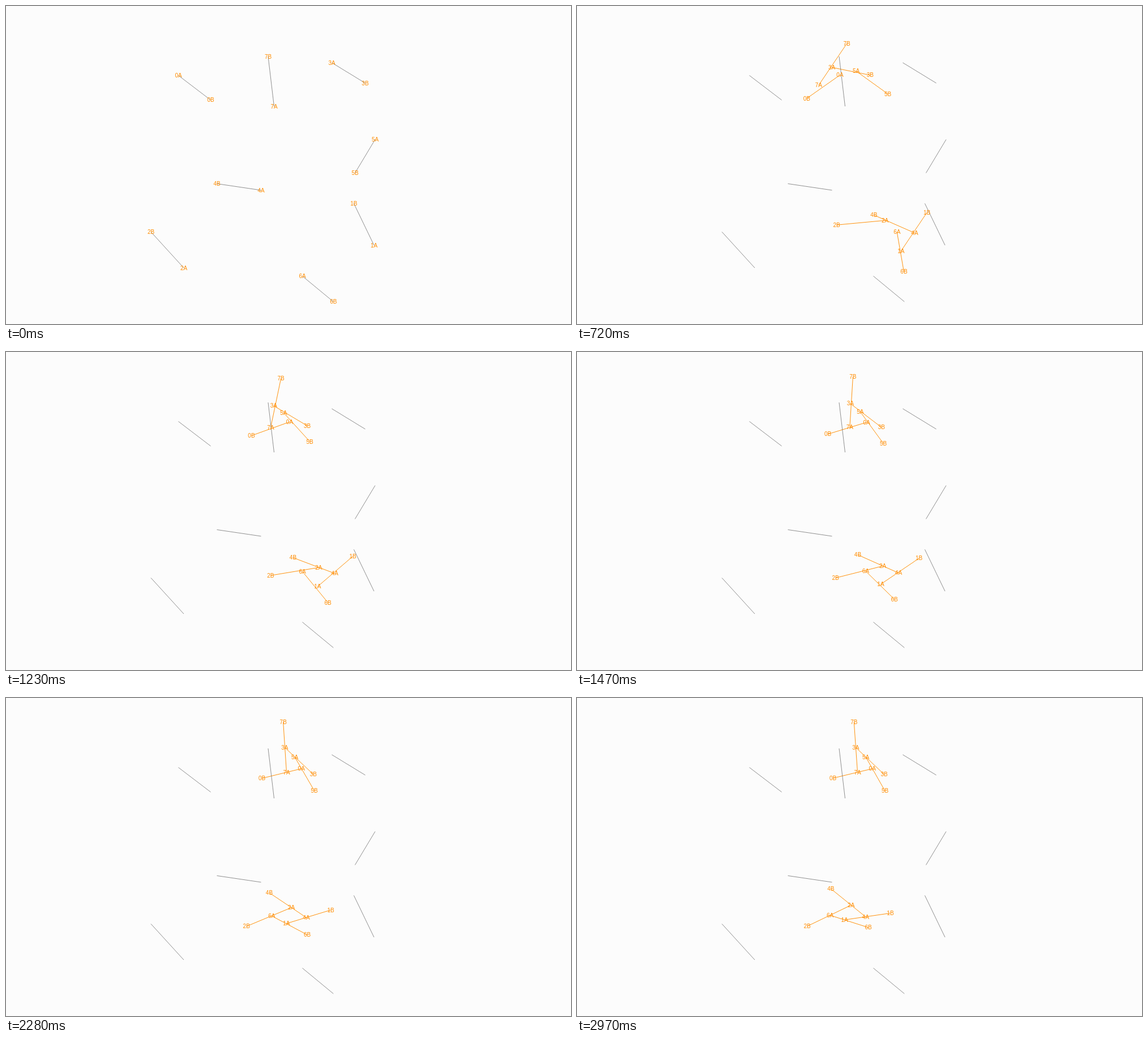
Write an HTML page with a canvas that moves like this. It is 998 px wide and 561 px high and loops after 3600 ms.

```html
<!DOCTYPE html>
<html>
<head>
<meta charset="utf-8">
<style>
html, body { margin: 0; width: 100%; height: 100%; overflow: hidden; background: #fcfcfc; }
canvas { display: block; }
</style>
</head>
<body>
<canvas id="stage" width="998" height="561"></canvas>
<script>
const ctx = document.getElementById('stage').getContext('2d');
const LOOP = 3600, STEP = 30, SWING = 420, MEET = 990, END = 2970;

// Each ring of rods closes on itself: end A of the next rod comes to rest on
// the current one. A rod flies from start through swing to meet, each given
// as end A and heading in degrees, then end A eases to rest.
const rings = [
  { settle: 1860, power: 1.5, rods: [
    { id: 7, length: 88.6, start: [473.5, 177, -96.8], swing: [401, 149, -46.2], meet: [450, 135, -66.1], rest: [495.5, 131] },
    { id: 3, length: 69.1, start: [575.5, 100, 31.4], swing: [447.5, 119, 0.8], meet: [460.5, 99.5, 20.9], rest: [492.4, 87.3] },
    { id: 5, length: 68.9, start: [652, 235.5, 121], swing: [526.5, 133, 41.6], meet: [478, 109, 36.9], rest: [510, 104] },
    { id: 0, length: 71.7, start: [304.5, 122.5, 37.3], swing: [420, 121, 120.6], meet: [488, 122.5, 156.4], rest: [521.7, 124.7] }
  ] },
  { settle: END, power: 1.33, rods: [
    { id: 4, length: 78.8, start: [450.5, 325, -171.6], swing: [587, 405.5, -149.4], meet: [594, 391.5, -162.6], rest: [509.7, 386] },
    { id: 2, length: 86, start: [314, 462, -132.4], swing: [497, 379.5, -184.5], meet: [565, 383, -182.4], rest: [484.2, 365.4] },
    { id: 6, length: 71, start: [523.5, 476.5, 39.5], swing: [597, 420, 104.4], meet: [538, 388, 58.7], rest: [447, 383.3] },
    { id: 1, length: 81.8, start: [650, 422, -115.8], swing: [588.5, 450, -71.3], meet: [565, 418, -48.2], rest: [472.5, 391.4] }
  ] }
];

const rad = deg => deg * Math.PI / 180;
const slowing = t => 1 - Math.exp(-t / 500);

// Parabola through start, swing and meet in slowing time.
function fly(rod, t) {
  const u = slowing(t), m = slowing(SWING), n = slowing(MEET);
  return rod.start.map((a, i) => {
    const s1 = (rod.swing[i] - a) / m;
    const s2 = (rod.meet[i] - rod.swing[i]) / (n - m);
    return a + u * (s1 + (u - m) * (s2 - s1) / n);
  });
}

function slide(rod, ring, t) {
  const left = 1 - Math.min(1, (t - MEET) / (ring.settle - MEET));
  return rod.rest.map((v, i) => v + (rod.meet[i] - v) * left ** ring.power);
}

const heading = ([x, y], [u, v]) => Math.atan2(v - y, u - x);

function pose(rod, i, ring, t) {
  let x, y, angle;
  if (t < MEET) {
    [x, y, angle] = fly(rod, t);
    angle = rad(angle);
  } else {
    // The rod turns to lie under its rider while the first miss fades.
    const rider = ring.rods[(i + 1) % ring.rods.length];
    const miss = rad(rod.meet[2]) - heading(rod.meet, rider.meet);
    const wrapped = Math.atan2(Math.sin(miss), Math.cos(miss));
    const end = slide(rod, ring, t);
    [x, y] = end;
    angle = heading(end, slide(rider, ring, t)) + wrapped * Math.exp((MEET - t) / 400);
  }
  return { id: rod.id, ax: x, ay: y,
    bx: x + rod.length * Math.cos(angle), by: y + rod.length * Math.sin(angle) };
}

const poses = t => rings.flatMap(ring => ring.rods.map((rod, i) => pose(rod, i, ring, t)));
const first = poses(0);

function drawLines(list, color, width) {
  ctx.strokeStyle = color;
  ctx.lineWidth = width;
  ctx.beginPath();
  for (const p of list) {
    ctx.moveTo(p.ax, p.ay);
    ctx.lineTo(p.bx, p.by);
  }
  ctx.stroke();
}

function draw(now) {
  const t = Math.min(END, Math.floor(now % LOOP / STEP) * STEP);
  const current = poses(t);
  ctx.fillStyle = '#fcfcfc';
  ctx.fillRect(0, 0, 998, 561);
  if (t > 0) drawLines(current, '#ff930f', 1);
  drawLines(first, '#747474', 0.8);
  ctx.fillStyle = '#ff8c00';
  ctx.font = '10px "Liberation Sans", Arial, sans-serif';
  ctx.textAlign = 'center';
  for (const p of current) {
    ctx.fillText(p.id + 'A', p.ax, p.ay + 3.5);
    ctx.fillText(p.id + 'B', p.bx, p.by + 3.5);
  }
}

function tick(now) {
  draw(now);
  requestAnimationFrame(tick);
}
draw(0);
requestAnimationFrame(tick);
</script>
</body>
</html>
```
